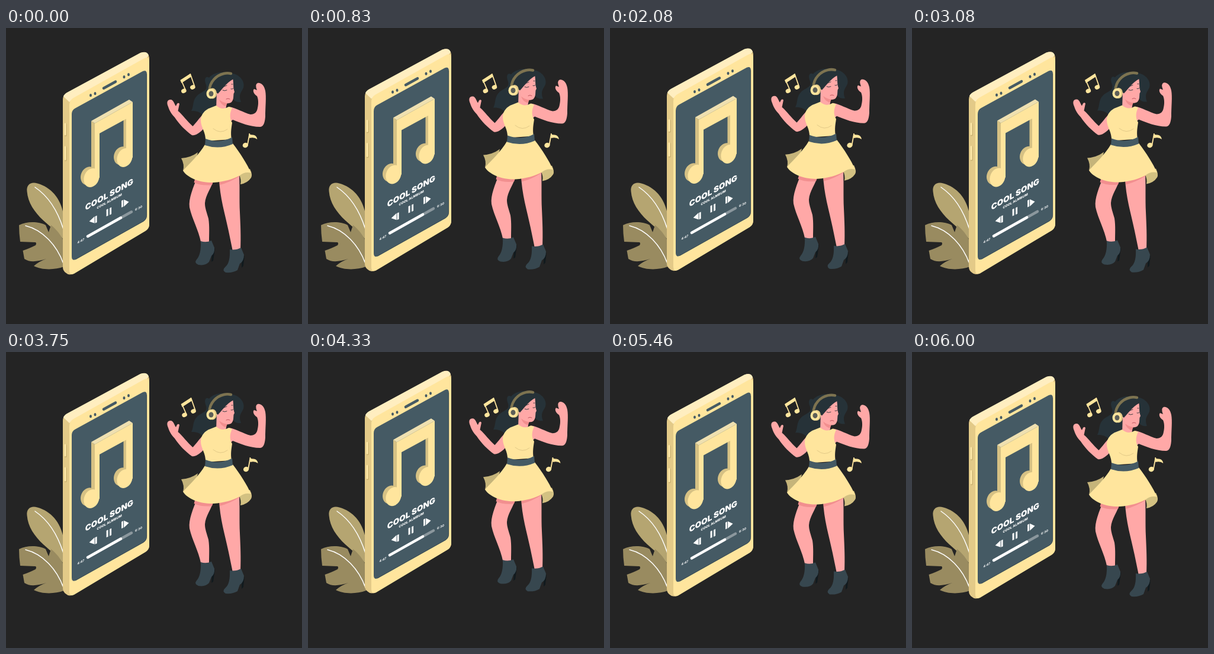
These frames come from a looping animation (500 by 500 pixels, 6.04 s). An HTML page:

```html
<!DOCTYPE html>
<html lang="en">
<head>
<meta charset="utf-8">
<title>Cool song</title>
<style>
  html, body { margin: 0; width: 100%; height: 100%; overflow: hidden; background: #242424; }
  svg { display: block; width: 100vw; height: 100vh; }
  text { font-family: Inter, Roboto, sans-serif; fill: #fff; text-anchor: middle; }
  .gold { fill: #ffe59d; }
  .pale { fill: #ffeec0; }
  .side { fill: #e3ca88; }
  .dim { fill: #d6c184; }
  .slate { fill: #455a64; }
  .navy { fill: #37474f; }
  .hair { fill: #263238; }
  .skin { fill: #ffa8a7; }
  .shade { fill: #f28f8f; }
  .white { fill: #fff; }
  .line { fill: none; stroke-linecap: round; stroke-linejoin: round; }
</style>
</head>
<body>
<svg viewBox="0 0 500 500">
  <g id="plant">
    <path fill="#b5a571" d="M35.500 276C34 264 43 259 53 262.500C76 269 92 287 97 314L104 365C88 346 74 335 63 325C48 311 37 295 35.500 276Z"/>
    <path class="line" stroke="#fff" stroke-width="1.500" d="M49 269C70 283 87 308 97 340"/>
    <path fill="#998b60" d="M22 333C36 326 56 327 67 333L72 345L76 333C88 342 97 356 103 372V398L98 403C82 409 60 409 47 402Q56 394 68 390C52 395 40 396 31 390L28.500 376Q38 373 50 367Q52 364 50 362L24 361Q22 347 22 333Z"/>
    <path class="line" stroke="#fff" stroke-width="1.500" d="M33 334C62 341 86 367 97 398"/>
  </g>

  <g class="float">
    <path class="side" d="M96 121Q96 114 102 110L227 42Q240 38 242 50V333Q241 339 236 342.500L114 415Q106 418.500 101 413.500Q96 410 96 404Z"/>
    <path class="pale" d="M97 115.500Q98 112 103 109L227 42Q238 38 241 46L236 53L113 121L107 125Z"/>
    <path class="gold" d="M107 130Q107 122 114 118L232 52Q242 46 242 57V331Q242 339 236 342.500L115 415Q107 419 107 409Z"/>
    <path class="slate" d="M111 146Q111 138.500 117 135.500L231 73Q238 70 238 78V316Q238 323 232 327L118 391Q111 394 111 386Z"/>
    <path class="line" stroke="#37474f" stroke-width=".8" d="M237.600 78V316Q238 323 232 326.500L118 390.500"/>
    <g transform="translate(0 .7)">
      <path class="line" stroke="#455a64" stroke-width="4.500" d="M165 101L185 90"/>
      <g class="slate">
        <ellipse cx="143" cy="113" rx="2" ry="2.600"/><ellipse cx="150.500" cy="110" rx="2" ry="2.600"/>
        <ellipse cx="199.500" cy="82" rx="2" ry="2.600"/><ellipse cx="207" cy="78" rx="2" ry="2.600"/>
      </g>
    </g>
    <g class="line">
      <path stroke="#c9b170" stroke-width="4" d="M100.800 163V181M100.800 202V223"/>
      <path stroke="#ffe9a8" stroke-width="3" d="M100 162V180M100 201V222"/>
    </g>

    <g id="bigNote">
      <g class="dim">
        <path d="M144 157L150 161V248H144ZM198.500 152L204 151V212H198.500Z"/>
        <ellipse cx="195.500" cy="216" rx="13" ry="16" transform="rotate(22 195.500 216)"/>
        <ellipse cx="139.500" cy="250" rx="13" ry="16" transform="rotate(22 139.500 250)"/>
      </g>
      <path fill="#efe0b0" d="M144 157L208 121L214 125L150 161Z"/>
      <path class="gold" d="M150 161L214 125V219H203V153.500L158 178V253H150Z"/>
      <g class="gold">
        <ellipse cx="200.500" cy="219" rx="12.500" ry="16.500" transform="rotate(22 200.500 219)"/>
        <ellipse cx="144.500" cy="253" rx="12.500" ry="16.500" transform="rotate(22 144.500 253)"/>
      </g>
    </g>

    <text transform="matrix(1 -.56 0 1 174.300 285.800)" font-size="13.500" font-weight="900">COOL SONG</text>
    <text transform="matrix(1 -.55 0 1 174.500 294.500)" font-size="5.500" font-weight="800">COOL ALMBUM</text>
    <text transform="matrix(1 -.5 0 1 126.500 361.500)" font-size="5.200" font-weight="700">4:47</text>
    <text transform="matrix(1 -.5 0 1 224 306)" font-size="5.200" font-weight="700">6:30</text>
    <g class="white" transform="translate(-.4 .7)">
      <path d="M141 326L150 317.500V329ZM151 317.500L154 316V327.500L151 329Z"/>
      <path d="M170 306L173 304.500V316L170 317.500ZM175.500 303.500L178.500 302V313.500L175.500 315Z"/>
      <path d="M195.500 291L198.500 289.500V301L195.500 302.500ZM199.500 289L208 293L199.500 301Z"/>
    </g>
    <g class="line" stroke-width="4.500">
      <path stroke="#8b979d" d="M138 352L212 310.500"/>
      <path stroke="#fff" d="M138 352L194 320.500"/>
    </g>
  </g>

  <g class="float">
    <path class="hair" d="M338 96C334 87 337 80 343 84C350 75 368 72 384 77C396 80 404 91 401 101C398 108 392 112 397 125C388 126 384 122 382 116L360 140L340 152C333 150 330 139 313 140C318 131 314 122 324 113C332 107 341 106 338 96Z"/>
    <path class="skin" d="M356 106L383 85C385 94 383 99 386 108L384.500 111L384 118C383 125 379 128 373 127L371 138H355Z"/>
    <path class="shade" d="M360 121Q366 126 374 127L371 132Q363 130 360 121Z"/>
    <path class="hair" d="M350 105C352 93 362 83 378 79L388 85C376 88 367 101 358 111Z"/>
    <g class="line" stroke="#263238" stroke-width=".9">
      <path d="M366 105Q369 107 373 105M380 103Q382 104 384 102M368 99L373 97M381 95L383 95"/>
      <path stroke="#b94d59" d="M372 120Q375 118 378 120"/>
    </g>
    <path class="line" stroke="#7d7350" stroke-width="4.500" d="M343.500 106C344 91 355 80 368 77Q374 75.500 380 77"/>
    <ellipse class="side" cx="349" cy="110.500" rx="7" ry="9"/>
    <ellipse class="gold" cx="346" cy="111" rx="7.500" ry="8.500"/>
    <ellipse cx="346.500" cy="111" rx="4" ry="4.500" fill="#5d5f58"/>

    <path class="skin" d="M344 137C332 143 326 155 315.500 166C306 158 299 147 290.500 140L293 128Q290 124 287 132C284 128 283 121 278 121C272 121 271 126 274 133C276 140 281 147 285 151C293 163 304 174 314 181C322 183 331 173 338 166Z"/>
    <path class="skin" d="M377 133C389 135 401 143 413 146C420 146 424 142 425 135C427 127 426 119 424 115C419 112 416 106 419 103L424 105Q420 95 425 93C431 92 436 97 438 106C440 117 438 132 438 150C437 162 434 167 429 167C412 167 396 160 383 155L377 160Z"/>

    <path class="skin" d="M324 250C316 270 308 288 310 303C314 322 325 340 329.500 363H343C343 347 344 335 342 322C339 311 336 304 336 296C337 282 347 270 352 254Z"/>
    <path class="skin" d="M360 254C361 286 370 314 376 343L383 377L396 375C397 351 396 333 395 311C394 289 395 270 394 246Z"/>
    <path class="shade" d="M320 252L352 254L348 265Q330 267 317.500 261ZM360 254L395 245L395 250Q378 261 361 265Z"/>
    <path d="M348 383L353 372L350 393L347 395ZM398 396L403 384L401 402L398 405Z" fill="#111a1e"/>
    <path class="navy" d="M329 360Q338 363 347 359L352 371Q353 380 347 385L343 395Q337 402 325 400Q317 397 322 391Q330 382 329 360Z"/>
    <path class="navy" d="M378 374Q388 376 397 371L402 383Q402 394 395 398L391 409Q383 414 371 413Q364 409 371 403Q379 396 378 374Z"/>

    <path fill="#c5b47a" d="M296 220Q312 219 324 210L318 237L299 241Q302 231 296 220Z"/>
    <path fill="#d3c182" d="M393 246L412 238Q417 248 414 253Q408 262 396 264Q398 256 393 246Z"/>
    <path class="gold" d="M336 197C327 213 309 230 299 241C307 254 330 262 351 261C368 260 384 255 395 249Q404 242 414 245C407 229 396 212 383 195Z"/>
    <path class="gold" d="M345 135L355 131Q365 140 376 133L382 135C377 145 378 154 382 160C381 168 379 176 381 188L337 191C338 176 329 168 329 156C329 146 336 138 345 135Z"/>
    <path class="line" stroke="#e3ca88" d="M350 170Q362 180 374 171"/>
    <path class="slate" d="M337 187Q361 196 382 184.500L383 196Q360 206 336 198Z"/>
  </g>

  <g class="shake gold">
    <path d="M295 88L312 77L314 82L297 93Z"/>
    <path class="line" stroke="#ffe59d" stroke-width="1.800" d="M297 89L304 105M312 78L319 98"/>
    <ellipse cx="301" cy="106.300" rx="4.400" ry="3.600" transform="rotate(-25 301 106.300)"/>
    <ellipse cx="316" cy="100" rx="4.400" ry="3.600" transform="rotate(-25 316 100)"/>
  </g>
  <g class="shake gold">
    <path d="M411 178Q413 181 418 180.500Q424 181 425 188Q420 184 412 186Z"/>
    <path class="line" stroke="#ffe59d" stroke-width="1.800" d="M408.500 198L412 179"/>
    <ellipse cx="405" cy="198" rx="4.700" ry="4.200" transform="rotate(-25 405 198)"/>
  </g>
</svg>
<script>
  const LOOP = 6040, PERIOD = 3000, LEAD = 20;
  // [phase, offset] pairs, joined linearly
  const RISE = [[0, 0], [.5, -10], [1, 0]];
  const SHAKE = [[0, 0], [.065, -6], [.185, 5], [.315, -3], [.435, 2], [.5, 0], [1, 0]];
  const floats = document.querySelectorAll('.float');
  const notes = document.querySelectorAll('.shake');

  function at(steps, p) {
    const i = steps.findIndex(s => s[0] > p);
    const [p0, v0] = steps[i - 1], [p1, v1] = steps[i];
    return v0 + (v1 - v0) * (p - p0) / (p1 - p0);
  }

  function move(parts, x, y) {
    for (const part of parts) part.setAttribute('transform', `translate(${x} ${y})`);
  }

  function draw() {
    const t = performance.now() % LOOP;
    move(floats, 0, at(RISE, t % PERIOD / PERIOD));
    move(notes, at(SHAKE, (t + LEAD) % PERIOD / PERIOD), 0);
    requestAnimationFrame(draw);
  }
  draw();
</script>
</body>
</html>
```
